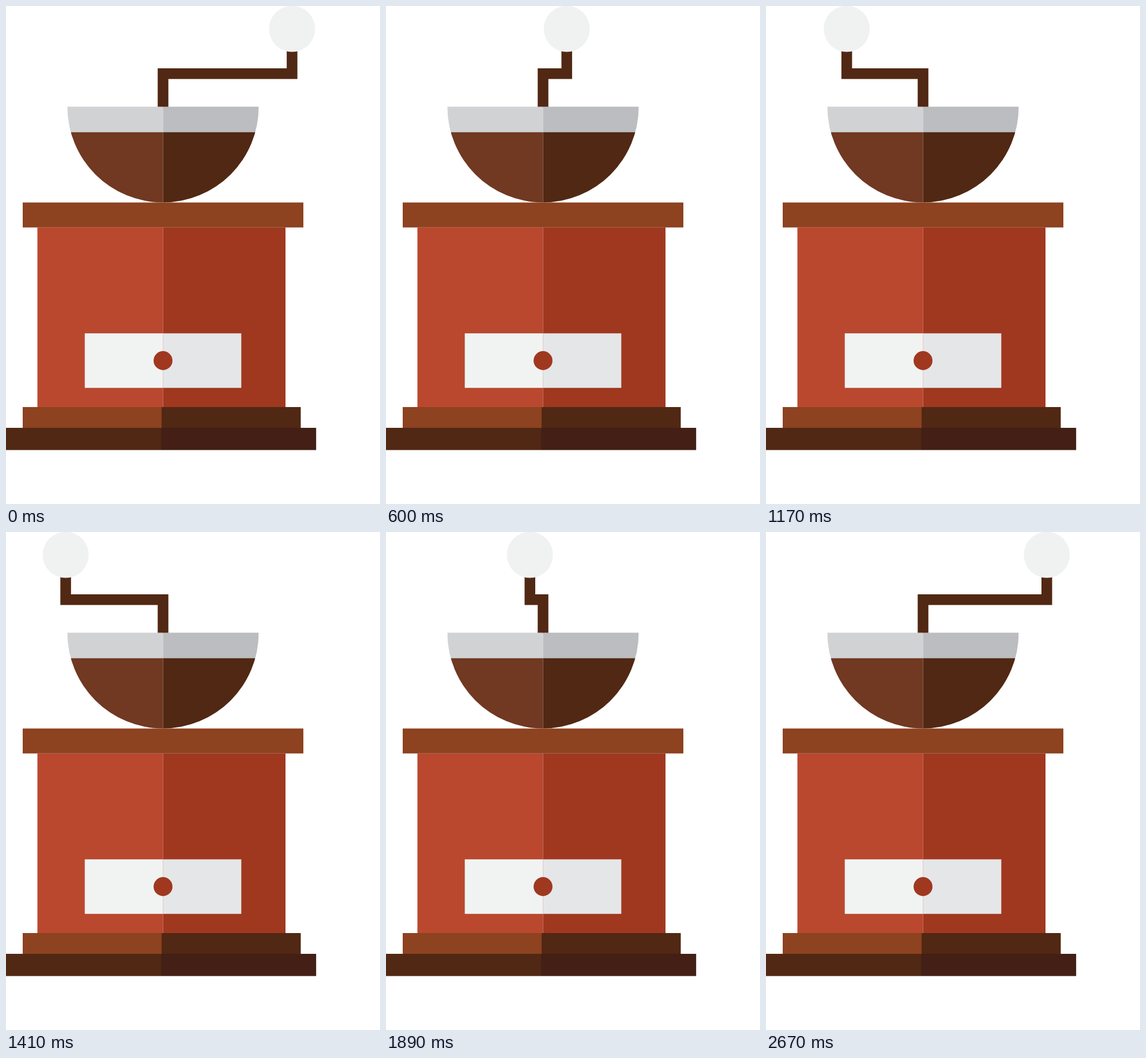
These frames come from a looping animation (649x863 px, 2.7 s). An HTML page:

```html
<!DOCTYPE html>
<html lang="en">
<head>
<meta charset="utf-8">
<title>Coffee grinder</title>
<style>
html, body { margin: 0; width: 100%; height: 100%; overflow: hidden; background: #fff; }
svg { display: block; }
</style>
</head>
<body>
<svg width="649" height="863" viewBox="0 0 649 863">
  <clipPath id="bowl"><path d="M106.5 174.5a166 166 0 0 0 332 0z"/></clipPath>

  <path id="crank" fill="none" stroke="#512813" stroke-width="18.5"/>
  <circle id="knob" cy="39.6" r="40" fill="#f0f2f1"/>

  <g clip-path="url(#bowl)">
    <path fill="#d1d2d4" d="M106 174H272.5V219H106z"/>
    <path fill="#bcbdc0" d="M272.5 174H439V219H272.5z"/>
    <path fill="#713822" d="M106 218.7H272.5V341H106z"/>
    <path fill="#512813" d="M272.5 218.7H439V341H272.5z"/>
  </g>

  <path fill="#8d4220" d="M29 340.6H516V383.7H29z"/>
  <path fill="#b9482f" d="M54.5 383.7H272.5V695H54.5z"/>
  <path fill="#a03820" d="M272.5 383.7H485V695H272.5z"/>

  <path fill="#f1f3f2" d="M136.7 567.3H272.5V661.7H136.7z"/>
  <path fill="#e5e6e8" d="M272.5 567.3H408.3V661.7H272.5z"/>
  <circle cx="272.5" cy="614.5" r="16.4" fill="#a03820"/>

  <path fill="#8d4220" d="M29 695H270V731H29z"/>
  <path fill="#512813" d="M270 695H511.5V731H270z"/>
  <path fill="#512813" d="M0 731H269V769.5H0z"/>
  <path fill="#431f15" d="M269 731H538.2V769.5H269z"/>
</svg>
<script>
const LOOP = 2700, STEP = 30;
const RIGHT = 496.4, LEFT = 85.3, SHAFT = 272.5;
const crank = document.getElementById('crank');
const knob = document.getElementById('knob');
const start = performance.now();

// The knob slides left and back at constant speed, in 30 ms steps.
function draw(now) {
  const elapsed = Math.max(0, now - start) % LOOP;
  const phase = Math.floor(elapsed / STEP) * STEP / LOOP;
  const x = LEFT + (RIGHT - LEFT) * Math.abs(1 - 2 * phase);
  crank.setAttribute('d', `M${SHAFT} 176V117.2H${x}V60`);
  knob.setAttribute('cx', x);
  requestAnimationFrame(draw);
}
draw(start);
</script>
</body>
</html>
```
